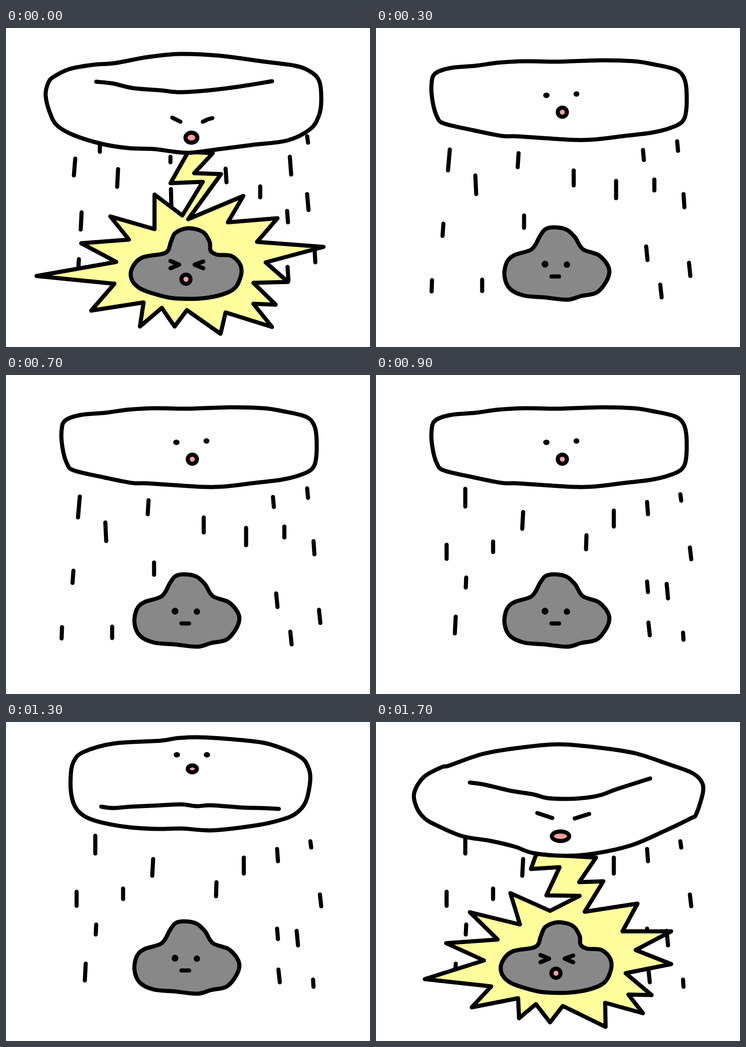
Recreate the animation shown at these times as an HTML page with a canvas. Size 799x701 px, loop 1.8 s.

```html
<!DOCTYPE html>
<html lang="en">
<head>
<meta charset="utf-8">
<title>Storm clouds</title>
<style>
html, body { margin: 0; width: 100%; height: 100%; overflow: hidden; background: #fff; }
canvas { display: block; }
</style>
</head>
<body>
<canvas id="stage" width="799" height="701"></canvas>
<script>
const ctx = document.getElementById('stage').getContext('2d');
const YELLOW = '#fffd9c', GRAY = '#888', PINK = '#ff9e9e', WHITE = '#fff';

const points = text => text.split(' ').map(p => p.split(',').map(Number));

function polygon(text, closed = true) {
  const path = new Path2D();
  points(text).forEach(p => path.lineTo(...p));
  if (closed) path.closePath();
  return path;
}

// Catmull-Rom spline through the given points
function curve(text, closed = true) {
  const pts = points(text), n = pts.length, path = new Path2D();
  const at = i => closed ? pts[(i + n) % n] : pts[Math.max(0, Math.min(n - 1, i))];
  path.moveTo(...pts[0]);
  for (let i = 0; i < (closed ? n : n - 1); i++) {
    const [a, b, c, d] = [at(i - 1), at(i), at(i + 1), at(i + 2)];
    path.bezierCurveTo(
      b[0] + (c[0] - a[0]) / 6, b[1] + (c[1] - a[1]) / 6,
      c[0] - (d[0] - b[0]) / 6, c[1] - (d[1] - b[1]) / 6, c[0], c[1]);
  }
  if (closed) path.closePath();
  return path;
}

function ellipse(x, y, rx, ry = rx) {
  const path = new Path2D();
  path.ellipse(x, y, rx, ry, 0, 0, 7);
  return path;
}

function lines(...texts) {
  const path = new Path2D();
  texts.forEach(t => path.addPath(polygon(t, false)));
  return path;
}

function dots(...list) {
  const path = new Path2D();
  list.forEach(d => path.addPath(ellipse(...d)));
  return path;
}

const rain = [
  '152,287 149,324 246,310 244,349 206,250 206,272 361,283 361,295 362,354 363,392 482,309 484,339 623,283 626,322 558,348 558,372 661,238 663,252 661,365 664,400 617,402 619,427 166,405 164,443 160,508 158,540 677,480 679,515 618,525 620,555',
  '162,267 158,313 218,324 220,365 313,275 311,306 434,313 434,346 586,268 588,290 661,249 663,270 527,336 527,374 611,333 611,357 675,365 677,394 325,412 325,439 148,430 146,457 123,554 122,579 233,553 233,578 593,480 596,510 687,516 690,545 624,564 627,592',
  '196,250 196,289 323,301 321,338 522,298 522,333 595,279 597,306 668,262 670,276 155,373 155,404 257,366 257,389 462,352 461,383 689,379 692,405 198,445 197,467 595,454 597,477 638,459 641,491 175,531 173,568 598,544 601,572 674,566 675,582'
].map(text => {
  const path = new Path2D();
  points(text).forEach((p, i) => i % 2 ? path.lineTo(...p) : path.moveTo(...p));
  return path;
});

const bursts = [
  '400,272 454,275 413,319 472,321 400,420 521,369 487,427 596,418 551,470 697,481 570,515 619,558 543,560 592,608 543,606 584,657 482,625 471,672 397,620 370,656 342,615 294,656 302,603 187,621 238,562 67,545 242,514 165,473 270,465 229,414 326,442 326,366 387,412 432,338 361,341',
  '400,290 463,293 434,326 481,325 458,414 536,378 507,440 601,427 556,482 685,492 564,527 611,571 546,576 593,620 539,610 562,662 455,629 449,668 379,619 350,645 333,616 267,648 279,599 159,600 229,550 113,523 246,498 177,456 278,455 240,398 357,428 377,366 433,404 437,346 365,351',
  '352,290 483,298 446,352 499,350 458,417 574,399 541,460 648,460 570,501 648,532 548,552 605,600 554,599 586,640 503,617 504,670 410,624 382,660 351,620 314,651 312,607 210,627 253,581 107,565 237,524 154,486 267,478 206,418 316,445 295,376 382,415 447,382 374,381 403,319 340,323'
].map(text => polygon(text));

const big = {
  calm: {
    body: curve('130,100 163,88 218,83 270,76 330,73 400,74 492,71 566,73 610,80 654,90 673,104 681,130 681,180 672,206 645,220 605,230 547,237 480,245 440,246 385,243 310,238 275,237 215,225 150,210 134,195 124,160 122,122'),
    dots: dots([374, 148, 7, 6], [440, 145, 6.5, 6]),
    mouth: ellipse(409, 185, 10)
  },
  inhale: {
    body: curve('148,88 170,66 238,47 340,41 380,35 440,34 548,43 598,55 645,76 662,96 668,125 658,175 635,202 600,216 550,227 455,238 385,234 330,235 260,230 190,215 157,194 144,163 142,120'),
    fold: curve('209,186 235,189 275,186 340,183 385,181 418,185 450,183 520,188 560,189 599,191', false),
    dots: dots([375, 72, 7, 6], [441, 72, 7, 6]),
    mouth: ellipse(409, 103, 10, 7.5)
  },
  blow: {
    body: curve('105,107 140,90 190,81 240,77 310,64 382,57 470,61 560,73 635,83 670,97 688,118 692,160 687,192 668,222 618,247 540,257 470,266 406,274 370,272 325,266 270,264 212,255 150,236 113,215 97,188 87,148 93,120'),
    fold: curve('198,118 235,122 278,132 340,137 382,141 445,137 510,129 584,117', false),
    eyes: lines('365,197 383,206', '432,206 442,201 453,198'),
    mouth: ellipse(407, 241, 13, 11)
  },
  roar: {
    body: curve('102,120 145,97 220,73 300,57 375,49 500,56 600,79 650,94 705,123 720,152 699,208 620,255 500,283 440,294 385,295 300,275 250,266 135,234 96,203 84,170 88,143'),
    fold: curve('206,134 255,143 300,156 350,163 405,167 465,162 520,151 550,141 585,133 607,124', false),
    eyes: lines('357,201 384,211', '436,211 470,203'),
    mouth: ellipse(407, 252, 18, 13)
  },
  shout: {
    body: curve('105,121 145,99 160,96 235,70 320,56 403,49 495,57 570,69 640,92 690,110 712,127 718,152 703,202 690,212 630,241 560,271 480,289 415,294 345,288 305,274 250,261 190,251 135,228 106,211 88,185 84,155'),
    fold: curve('206,133 240,138 295,151 345,159 375,167 420,169 465,166 495,160 530,147 602,124', false),
    eyes: lines('354,200 387,211', '436,212 468,202'),
    mouth: ellipse(405, 251, 19, 10.5)
  }
};

const small = {
  calm: {
    body: curve('372,442 392,438 418,443 437,460 454,486 490,500 511,527 508,552 485,581 450,589 420,597 370,592 325,588 294,573 282,545 287,515 304,499 342,486 360,457'),
    dots: dots([371, 519, 7.5], [419, 520, 7]),
    eyes: lines('385,546 402,546')
  },
  hit: {
    body: curve('372,450 400,440 432,448 447,470 449,489 463,498 495,501 515,522 514,550 495,577 440,593 370,594 325,584 292,571 275,550 278,525 300,504 350,494 362,470'),
    eyes: lines('361,512 380,520 361,528', '433,513 414,520 433,528'),
    mouth: ellipse(395, 552, 10)
  }
};

function shape(path, fill) {
  ctx.fillStyle = fill;
  ctx.fill(path);
  ctx.stroke(path);
}

function drawCloud({ body, fold, eyes, dots, mouth }, fill, dy = 0) {
  ctx.save();
  ctx.translate(0, dy);
  shape(body, fill);
  if (fold) ctx.stroke(fold);
  if (eyes) ctx.stroke(eyes);
  if (mouth) shape(mouth, PINK);
  ctx.fillStyle = '#000';
  if (dots) ctx.fill(dots);
  ctx.restore();
}

// Strike steps: [cloud pose, burst]
const strikes = { 0: ['blow', 0], 14: ['blow', 0], 15: ['roar', 1], 16: ['shout', 0], 17: ['shout', 2] };
const rainCycle = [0, 2, 0, 1];

function draw(step) {
  const strike = strikes[step];
  const pose = strike ? strike[0] : step < 12 ? 'calm' : 'inhale';
  ctx.fillStyle = WHITE;
  ctx.fillRect(0, 0, 799, 701);
  ctx.lineWidth = 9;
  ctx.lineCap = ctx.lineJoin = 'round';
  ctx.stroke(rain[rainCycle[step % 4]]);
  if (strike) shape(bursts[strike[1]], YELLOW);
  drawCloud(strike ? small.hit : small.calm, GRAY);
  drawCloud(big[pose], WHITE, step === 12 ? 8 : 0);
}

function tick() {
  draw(Math.floor(performance.now() % 1800 / 100));
  requestAnimationFrame(tick);
}
tick();
</script>
</body>
</html>
```
